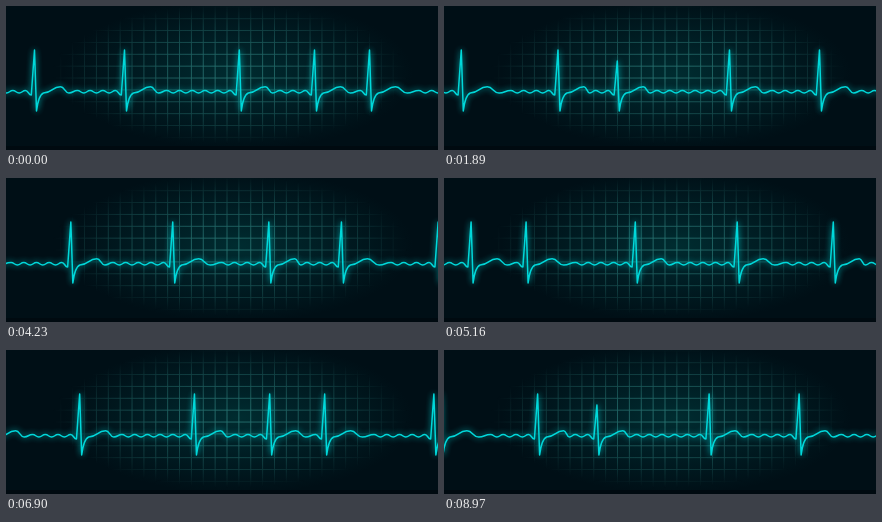
An HTML page that plays this animation: 432 px wide and 144 px high, repeating every 9000 ms.

```html
<!DOCTYPE html>
<html lang="en">
<head>
<meta charset="utf-8">
<title>Heartbeat</title>
<style>
html, body { margin: 0; width: 100%; height: 100%; overflow: hidden; background: #000f16; }
svg { display: block; width: 100vw; height: 100vh; }
</style>
</head>
<body>
<svg viewBox="0 0 432 144" preserveAspectRatio="none">
  <defs>
    <radialGradient id="haze" gradientUnits="userSpaceOnUse" cx="0" cy="0" r="1" gradientTransform="translate(232 68) scale(175 76)">
      <stop offset="0" stop-color="#002c30"/>
      <stop offset=".4" stop-color="#002026"/>
      <stop offset="1" stop-color="#000f16"/>
    </radialGradient>
    <radialGradient id="fade" gradientUnits="userSpaceOnUse" cx="0" cy="0" r="1" gradientTransform="translate(224 68) scale(178 70)">
      <stop offset="0" stop-color="#fff"/>
      <stop offset=".35" stop-color="#bbb"/>
      <stop offset=".7" stop-color="#666"/>
      <stop offset="1" stop-color="#000"/>
    </radialGradient>
    <mask id="vignette" maskUnits="userSpaceOnUse" x="0" y="0" width="432" height="144">
      <rect width="432" height="144" fill="url(#fade)"/>
    </mask>
    <filter id="glow" filterUnits="userSpaceOnUse" x="-20" y="0" width="472" height="144" color-interpolation-filters="sRGB">
      <feGaussianBlur in="SourceGraphic" stdDeviation="3" result="blur"/>
      <feComponentTransfer in="blur" result="halo"><feFuncA type="linear" slope=".9"/></feComponentTransfer>
      <feMerge>
        <feMergeNode in="halo"/>
        <feMergeNode in="SourceGraphic"/>
      </feMerge>
    </filter>
  </defs>
  <rect width="432" height="144" fill="url(#haze)"/>
  <path id="grid" fill="none" stroke="#2a7674" stroke-width=".9" mask="url(#vignette)"/>
  <rect y="140" width="432" height="4" fill="#000a10"/>
  <g filter="url(#glow)">
    <path id="trace" fill="none" stroke="#00d8da" stroke-width="1.5" stroke-linejoin="round"/>
  </g>
</svg>
<script>
const LOOP = 9000, STEP = 30, SPEED = 4.079, PERIOD = 983;
const CELL = 11.87, VALLEY = 87, RIPPLE = 12.7;
const TOP = 44, LOW = 105;

const beats = [28.5, 118.5, 233.3, 308.5, 363.5, 472.7, 574.6, 670.7, 743.3, 840, 899.3];
const weakBeat = beats.length - 1;

// Crests after a beat: one tall wave, then ripples up to the next beat
function crests(gap) {
  const count = Math.max(1, Math.round((gap - 40) / RIPPLE));
  const ripples = Array.from({ length: count }, (_, i) => [gap - 9 - (count - 1 - i) * RIPPLE, 84.5]);
  return [[26, 80.8], ...ripples];
}

function tracePath() {
  let d = "", x0, y0;
  const line = (x, y) => { d += `${d ? "L" : "M"}${x} ${y}`; x0 = x; y0 = y; };
  const ease = (x, y) => {
    const mid = (x0 + x) / 2;
    d += `C${mid} ${y0} ${mid} ${y} ${x} ${y}`;
    x0 = x; y0 = y;
  };
  for (const shift of [-2 * PERIOD, -PERIOD, 0]) {
    beats.forEach((beat, i) => {
      const x = beat + shift;
      const gap = (beats[i + 1] ?? beats[0] + PERIOD) - beat;
      (d ? ease : line)(x - 3.2, 89);
      line(x, i === weakBeat ? TOP + 11 : TOP);
      line(x + 2, LOW);
      d += `Q${x + 4} 89 ${x + 9} ${VALLEY}`;
      x0 = x + 9; y0 = VALLEY;
      for (const [dx, y] of crests(gap)) {
        if (x0 > x + 9) ease((x0 + x + dx) / 2, VALLEY);
        ease(x + dx, y);
      }
    });
  }
  return d;
}

function gridPath() {
  let d = "";
  for (let x = 221 % CELL; x < 432; x += CELL) d += `M${x} 0V140`;
  for (let y = 48.3 % CELL; y < 140; y += CELL) d += `M0 ${y}H432`;
  return d;
}

const trace = document.getElementById("trace");
trace.setAttribute("d", tracePath());
document.getElementById("grid").setAttribute("d", gridPath());

function render(now) {
  const frame = Math.floor((now % LOOP) / STEP);
  trace.setAttribute("transform", `translate(${(frame * SPEED) % PERIOD} 0)`);
}

const start = performance.now();
function tick() {
  render(performance.now() - start);
  requestAnimationFrame(tick);
}
tick();
</script>
</body>
</html>
```
